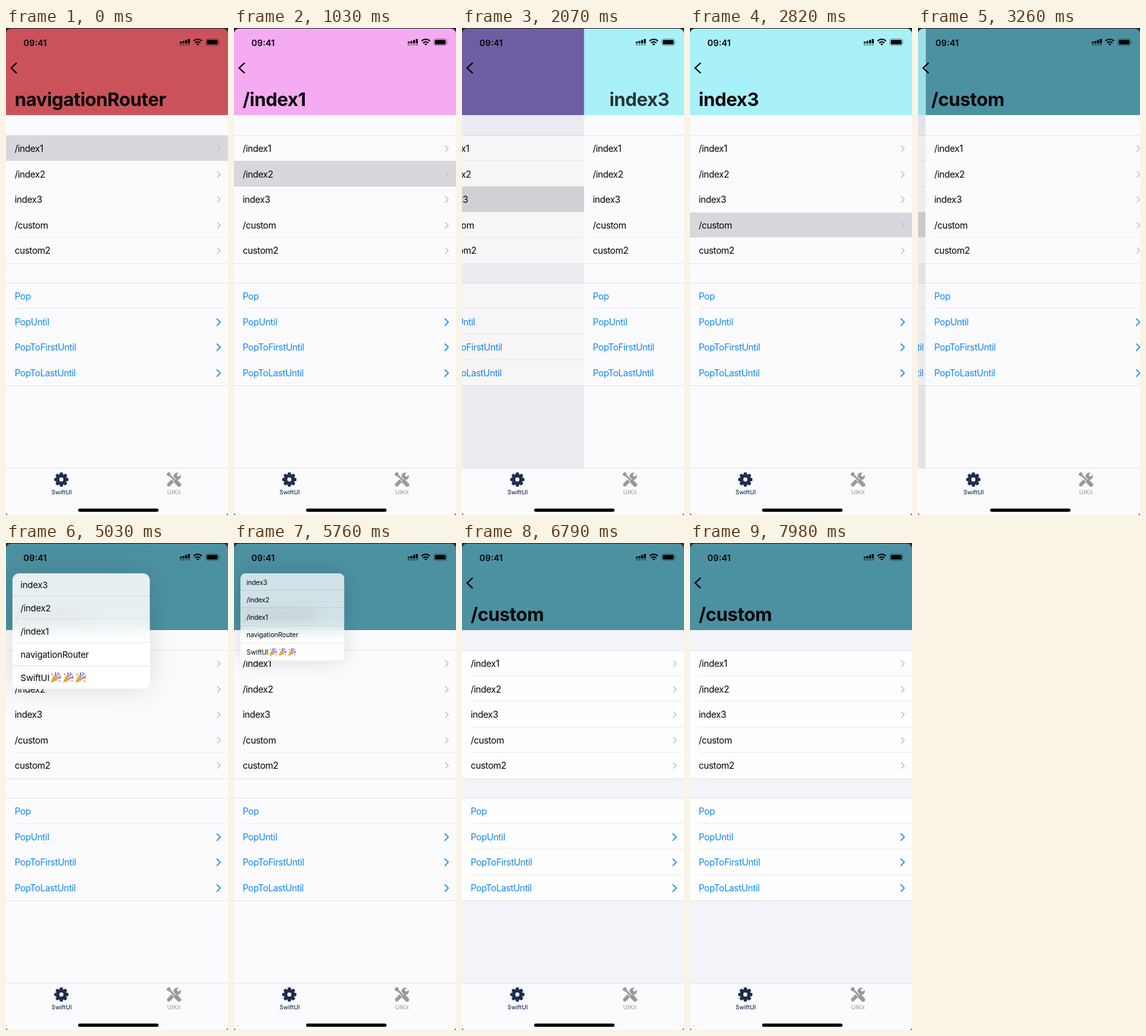
An HTML page that plays this animation: 345x755 px, repeating every 8 s.

```html
<!DOCTYPE html>
<html lang="en">
<head>
<meta charset="utf-8">
<title>Navigation router</title>
<style>
  html, body { margin: 0; width: 100%; height: 100%; overflow: hidden; background: #fbfbfd; }
  #stage {
    position: absolute; left: 0; top: 0; width: 345px; height: 755px; overflow: hidden;
    font: 14.2px/20px Inter, "Open Sans", sans-serif; font-optical-sizing: none;
    letter-spacing: -.4px; color: #050507; white-space: nowrap;
  }
  #stage div, #stage svg { position: absolute; }
  .page { inset: 0; background: #f4f3fa; overflow: hidden; }
  .header { left: 0; top: 0; width: 345px; height: 135px; }
  .group { left: 0; width: 345px; background: #fefeff; box-shadow: 0 -1px #e3e3e7, 0 1px #e3e3e7; }
  .row { left: 0; width: 345px; height: 39.6px; }
  .row span { position: absolute; left: 13.5px; top: 10.3px; }
  .row svg { left: 324.5px; top: 13.3px; }
  .row.line::after {
    content: ""; position: absolute; left: 14px; right: 0; bottom: 0; height: 1px; background: #ececf0;
  }
  .action { color: #1487f4; }
  .pressed { background: #d8d7dd; }
  .pale { background: #fbfbfd; }
  .pale .group { background: #fbfbfd; }
  .pale .soft::after { display: none; }
  .shade { inset: 0; background: #000; }
  .title { left: 13.5px; top: 93.4px; font-size: 28.8px; line-height: 36px; font-weight: 700; letter-spacing: -.4px; }
  #tabs { left: 0; top: 682px; width: 345px; height: 73px; background: #fbfbfd; box-shadow: inset 0 1px #e4e4e8; }
  .tab { top: 32px; width: 80px; text-align: center; font-size: 9px; line-height: 12px; font-weight: 500; letter-spacing: .1px; }
  #home { left: 112px; top: 745px; width: 125px; height: 5px; border-radius: 3px; background: #000; }
  #clock { left: 27px; top: 12.5px; font-size: 13.6px; font-weight: 600; letter-spacing: 0; }
  #bezel { inset: 1px 0 0; border-radius: 8px 8px 4px 4px; box-shadow: 0 0 0 9px #232124; }
  #menu {
    left: 10px; top: 47px; width: 221px; height: 186px; border-radius: 11px; overflow: hidden;
    transform-origin: 0 0; backdrop-filter: blur(14px); letter-spacing: -.2px;
  }
  #menuShadow {
    left: 10px; top: 47px; width: 221px; height: 186px; border-radius: 11px;
    transform-origin: 0 0; box-shadow: 0 0 45px rgba(0, 0, 0, .13);
  }
  .item { left: 0; width: 100%; height: 37.2px; line-height: 37.2px; text-indent: 13px; box-shadow: inset 0 -1px rgba(0, 0, 0, .1); }
  .item svg { top: 9px; }
</style>
</head>
<body>
<div id="stage">
  <div id="pages"></div>
  <div id="titles"></div>
  <svg id="back" width="30" height="30" style="left:0;top:47px" fill="none" stroke="#000" stroke-width="2.2">
    <path d="M16.5 7 8 15l8.500 8"/>
  </svg>
  <div id="tabs">
    <svg width="345" height="36" style="left:0;top:0">
      <g id="gear" transform="translate(86 18)" fill="#1c2d4f"></g>
      <g transform="translate(261 18)" stroke="#99999d" fill="none">
        <path d="M-8 8 4-4" stroke-width="5.500" stroke-linecap="round"/>
        <circle cx="5" cy="-5" r="5.800" fill="#99999d" stroke="none"/>
        <path d="M5.500-5.500 12-12" stroke="#fbfbfd" stroke-width="4"/>
        <path d="M-7-7 9 9" stroke="#fbfbfd" stroke-width="5"/>
        <path d="M-9-9 3 3" stroke-width="2.800"/>
        <path d="M-10-10-6.500-6.500" stroke-width="5.500"/>
        <path d="M3.500 3.500 8 8" stroke-width="6.500" stroke-linecap="round"/>
      </g>
    </svg>
    <div class="tab" style="left:46.500px;color:#1c2d4f">SwiftUI</div>
    <div class="tab" style="left:221px;color:#a3a3a6">UIKit</div>
  </div>
  <div id="home"></div>
  <div id="clock">09:41</div>
  <svg width="70" height="20" style="left:267px;top:12px">
    <path d="M3 9h3v3H3zM7.200 8h3v4h-3zM11.400 6.500h3V12h-3zM15.600 5h3v7h-3z"/>
    <path d="M3 14h15.600" stroke="#000" stroke-opacity=".45" stroke-width="2" stroke-dasharray="3 1.200"/>
    <g fill="none" stroke="#000" stroke-width="2">
      <path d="M24.500 8.300a9 9 0 0 1 13 0M27 11.200a5.500 5.500 0 0 1 8 0"/>
    </g>
    <path d="M28.800 13a3.200 3.200 0 0 1 4.400 0L31 15.300z"/>
    <rect x="43.500" y="5" width="20" height="10" rx="3" fill="none" stroke="#000" stroke-opacity=".4"/>
    <rect x="45" y="6.500" width="17" height="7" rx="1.500"/>
    <path d="M65 8.500q1.600 1.500 0 3z" opacity=".5"/>
  </svg>
  <div id="menuShadow"></div>
  <div id="menu"></div>
  <div id="bezel"></div>
</div>
<script>
const WIDTH = 345, LOOP = 8000, STEP = 147.8, ROW = 39.6;
const PAGES = [
  ['navigationRouter', '#ca535b'], ['/index1', '#f4abf2'], ['/index2', '#7161a9'],
  ['index3', '#a8f1f8'], ['/custom', '#4c91a2']
];
const ROUTES = ['/index1', '/index2', 'index3', '/custom', 'custom2'];
const ACTIONS = ['Pop', 'PopUntil', 'PopToFirstUntil', 'PopToLastUntil'];
const PUSHES = [80, 1080, 1952, 2851];
const MENU_OPEN = 4700, MENU_CLOSE = 5686, BACK_PRESS = 4200;

const $ = id => document.getElementById(id);
const chevron = (reach, color, weight) =>
  `<svg width="14" height="14" fill="none" stroke="${color}" stroke-width="${weight}">` +
  `<path d="M${8 - reach} ${7 - reach}l${reach} ${reach}-${reach} ${reach}"/></svg>`;
const GREY_ARROW = chevron(4.6, '#c4c4c8', 1.5), BLUE_ARROW = chevron(5.6, '#1487f4', 1.6);

function group(top, labels, kind, arrow, solid) {
  const rows = labels.map((label, i) => {
    const line = i < labels.length - 1 ? (i === solid ? 'line' : 'line soft') : '';
    return `<div class="row ${kind} ${line}" style="top:${i * ROW}px"><span>${label}</span>` +
      `${label === 'Pop' ? '' : arrow}</div>`;
  });
  return `<div class="group" style="top:${top}px;height:${labels.length * ROW}px">${rows.join('')}</div>`;
}

$('pages').style.inset = '0';
$('pages').innerHTML = PAGES.map(([, color]) =>
  `<div class="page"><div class="header" style="background:${color}"></div>` +
  group(166.8, ROUTES, 'route', GREY_ARROW, 3) +
  group(395.8, ACTIONS, 'action', BLUE_ARROW, 0) +
  '<div class="shade"></div></div>').join('');
$('titles').innerHTML = PAGES.map(([name]) => `<div class="title">${name}</div>`).join('');

$('gear').innerHTML = [0, 45, 90, 135].map(a =>
  `<rect x="-2.500" y="-11" width="5" height="22" rx="1.200" transform="rotate(${a})"/>`).join('') +
  '<circle r="8.600"/><circle r="3.200" fill="#fbfbfd"/>';

const popper = i => `<svg width="19" height="19" style="left:${59.5 + i * 20}px">
  <path d="M1 18 6 6q5 2 7 7z" fill="#f0b23c"/><path d="M3 13l4 3M5 9l5 5" stroke="#b97822"/>
  <path d="M8 7q3-2 1-6M12 11q3-3 6-1" fill="none" stroke="#7659b5" stroke-width="1.800"/>
  <path d="M10 9q2-4 6-6" fill="none" stroke="#d55b7c" stroke-width="1.800"/>
  <path d="M3 3h2v2H3zM15 14h2v2h-2z" fill="#e0577c"/><path d="M12 1h2v2h-2zM16 6h2v2h-2z" fill="#4b91d5"/>
</svg>`;
const items = PAGES.slice(0, 4).map(page => page[0]).reverse();
items.push('SwiftUI' + [0, 1, 2].map(popper).join(''));
$('menu').innerHTML = items.map((item, i) =>
  `<div class="item" style="top:${i * 37.2}px">${item}</div>`).join('');

const pages = [...$('pages').children], titles = [...$('titles').children];
const routes = pages.map(page => page.querySelectorAll('.route'));

// Critically damped spring from 0 to 1, with rate in 1/s.
function spring(ms, rate) {
  const x = Math.max(0, ms) * rate / 1000;
  return 1 - (1 + x) * Math.exp(-x);
}
const between = (t, from, to) => t >= from && t < to;

function render(time) {
  const t = Math.floor((time + 12) / STEP) * STEP;
  const washed = t < 3600 || between(t, MENU_OPEN, 6400);

  pages.forEach((page, i) => {
    const enter = i ? t - PUSHES[i - 1] : 1e4;
    const leave = i < PUSHES.length ? t - PUSHES[i] : -1;
    const pIn = spring(enter, 13), pOut = spring(leave, 13);
    const visible = enter > 0 && leave < 800;
    const settle = enter > 800 ? 0 : 1 - pIn;
    page.style.display = visible ? '' : 'none';
    page.style.transform = `translateX(${WIDTH * (settle - .3 * pOut)}px)`;
    page.classList.toggle('pale', washed && leave <= 0);
    page.lastChild.style.opacity = .07 * pOut;
    if (i < PUSHES.length) routes[i][i].classList.toggle('pressed', leave > -130);

    const qIn = enter > 800 ? 1 : spring(enter - 35, 15.9), qOut = spring(leave - 35, 15.9);
    titles[i].style.display = visible ? '' : 'none';
    titles[i].style.opacity = Math.min(1, 2.1 * qIn) * Math.max(0, 1 - 3 * qOut);
    titles[i].style.transform = `translateX(${WIDTH * (1 - qIn - .3 * qOut)}px)`;
  });

  const open = spring(t - MENU_OPEN, 16) * (1 - spring(t - MENU_CLOSE, 13));
  const shown = open > .25;
  for (const part of [$('menu'), $('menuShadow')]) {
    part.style.display = shown ? '' : 'none';
    part.style.transform = `scale(${open})`;
  }
  $('menu').style.background = `rgba(255,255,255,${Math.min(.88, .74 + Math.max(0, open - .73) * .52)})`;
  $('back').style.opacity = shown ? 0 : between(t, BACK_PRESS, MENU_CLOSE) ? .25 : 1;
}

const start = performance.now();
function tick() {
  render((performance.now() - start) % LOOP);
  requestAnimationFrame(tick);
}
tick();
</script>
</body>
</html>
```
